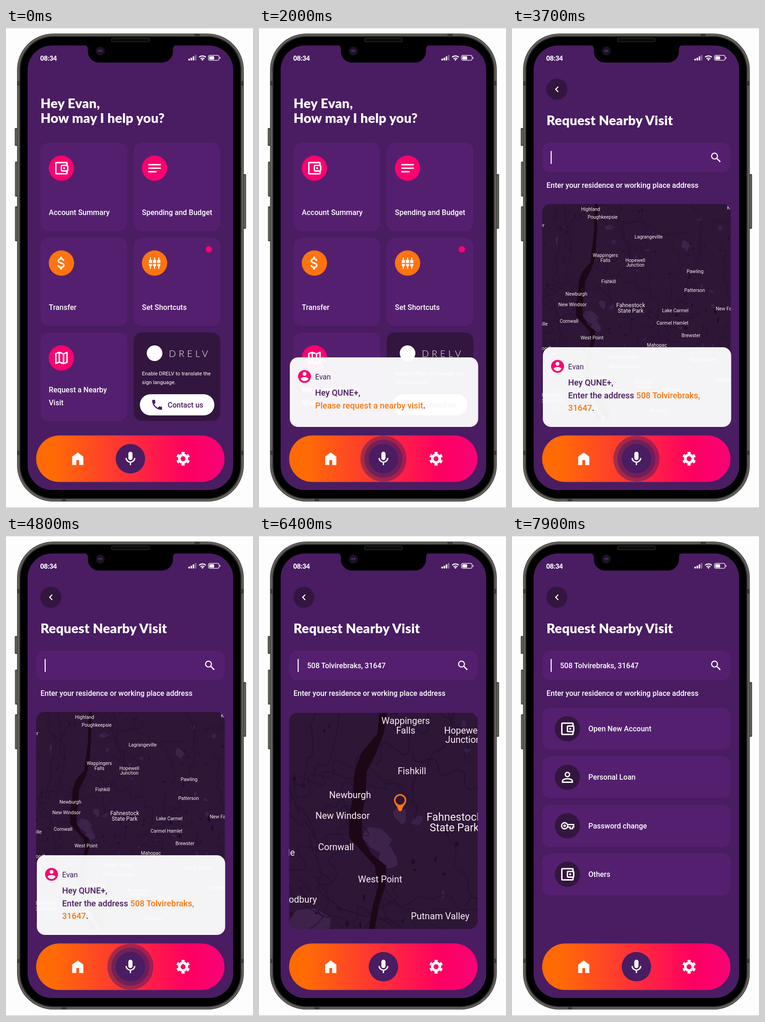
Recreate the animation shown at these times as an HTML page. Size 537 by 1042 pixels, loop 8000 ms.

```html
<!DOCTYPE html>
<html lang="en">
<head>
<meta charset="utf-8">
<title>Voice banking</title>
<style>
  html, body { margin: 0; width: 100%; height: 100%; overflow: hidden; background: #fefdfe; }
  svg { display: block; width: 100%; height: 100%; }
  text { font: 500 16px Roboto, sans-serif; fill: #fff; white-space: pre; }
  .title { font: 900 28.6px Lato, sans-serif; letter-spacing: .25px; }
  .clock { font: 900 14px Lato, sans-serif; }
  .wordmark { font: 300 20px Lato, sans-serif; letter-spacing: 6.2px; }
  .small { font-size: 11.4px; font-weight: 400; }
  .name { font-weight: 400; fill: #40195a; }
  .speech { font-size: 18.3px; fill: #4a1c62; }
  .speech .key { fill: #f9760f; }
  .town { font-size: 10.4px; font-weight: 400; fill: #fbeef3; text-anchor: middle; }
  .park { font-size: 12.2px; }
</style>
</head>
<body>
<svg id="stage" viewBox="0 0 537 1042" xmlns="http://www.w3.org/2000/svg"></svg>
<script>
const PINK = '#fb036f', ORANGE = '#ff7410', SCREEN = '#4a1c62', CARD = '#551f6f', DARK = '#33163f';
const USER = 'Evan', BANK = 'QUNE+', SIGNER = 'DRELV', STREET = '508 Tolvirebraks,', ZIP = '31647';

const rect = (x, y, w, h, r, fill, more = '') =>
  `<rect x="${x}" y="${y}" width="${w}" height="${h}" rx="${r}" fill="${fill}" ${more}/>`;
const circle = (x, y, r, fill, more = '') => `<circle cx="${x}" cy="${y}" r="${r}" fill="${fill}" ${more}/>`;
const path = (d, fill, more = '') => `<path d="${d}" fill="${fill}" ${more}/>`;
const line = (d, color, width, more = '') => path(d, 'none', `stroke="${color}" stroke-width="${width}" ${more}`);
const text = (x, y, str, cls = '', more = '') => `<text x="${x}" y="${y}" class="${cls}" ${more}>${str}</text>`;
const group = (id, body, more = '') => `<g id="${id}" ${more}>${body}</g>`;

// Icons live on a 24 unit grid and are placed by their centre.
const ICONS = {
  wallet: path('M21 7.3V5a2 2 0 0 0-2-2H5a2 2 0 0 0-2 2v14a2 2 0 0 0 2 2h14a2 2 0 0 0 2-2v-2.3a2 2 0 0 0 1-1.7V9a2 2 0 0 0-1-1.7zM20 9v6h-7V9zM5 19V5h14v2h-6a2 2 0 0 0-2 2v6a2 2 0 0 0 2 2h6v2z', '#fff')
    + circle(16, 12, 1.5, '#fff'),
  notes: path('M3 18h12v-2H3zM3 6v2h18V6zM3 13h18v-2H3z', '#fff'),
  dollar: path('M11.8 10.9c-2.27-.59-3-1.2-3-2.15 0-1.09 1.01-1.85 2.7-1.85 1.78 0 2.44.85 2.5 2.1h2.21c-.07-1.72-1.12-3.3-3.21-3.81V3h-3v2.16c-1.94.42-3.5 1.68-3.5 3.61 0 2.31 1.91 3.46 4.7 4.13 2.5.6 3 1.48 3 2.41 0 .69-.49 1.79-2.7 1.79-2.06 0-2.87-.92-2.98-2.1h-2.2c.12 2.19 1.76 3.42 3.68 3.83V21h3v-2.15c1.95-.37 3.5-1.5 3.5-3.55 0-2.84-2.43-3.81-4.7-4.4z', '#fff'),
  sliders: [4, 12, 20].map(x => path(`M${x - 1} 6V2a1 1 0 0 1 2 0v4h2v6h-6V6zM${x - 3} 14h6v2a3 3 0 0 1-2 2.8V23h-2v-4.2a3 3 0 0 1-2-2.8z`, '#fff')).join(''),
  map: line('M4 5.7L9 4l6 2.1 5-1.9v14.1L15 20l-6-2.1-5 1.9zM9 4v14M15 6v14', '#fff', 2, 'stroke-linejoin="round"'),
  home: path('M4 21V9l8-6 8 6v12h-6v-7h-4v7z', '#fff'),
  mic: path('M12 14a3 3 0 0 0 3-3V5a3 3 0 0 0-6 0v6a3 3 0 0 0 3 3z', '#fff')
    + line('M5.9 11a6.1 5.9 0 0 0 12.2 0M12 17v4', '#fff', 1.9),
  gear: circle(12, 12, 5.4, 'none', 'stroke="#fff" stroke-width="3.7"')
    + circle(12, 12, 8.3, 'none', 'stroke="#fff" stroke-width="3" pathLength="12" stroke-dasharray="1 1" stroke-dashoffset=".5" transform="rotate(30 12 12)"'),
  phone: path('M6.62 10.79c1.44 2.83 3.76 5.14 6.59 6.59l2.2-2.2c.27-.27.67-.36 1.02-.24 1.12.37 2.33.57 3.57.57.55 0 1 .45 1 1V20c0 .55-.45 1-1 1-9.39 0-17-7.61-17-17 0-.55.45-1 1-1h3.5c.55 0 1 .45 1 1 0 1.25.2 2.45.57 3.57.11.35.03.74-.25 1.02z', SCREEN),
  person: circle(12, 8, 3.05, 'none', 'stroke="#fff" stroke-width="1.9"')
    + line('M5 17c0-1.6 4-3 7-3s7 1.4 7 3v2H5z', '#fff', 1.9),
  avatar: circle(12, 12, 10, PINK) + circle(12, 8, 3, '#fff')
    + path('M12 19.2c-2.5 0-4.7-1.3-6-3.2 0-2 4-3.1 6-3.1s6 1.1 6 3.1c-1.3 1.9-3.5 3.2-6 3.2z', '#fff'),
  key: circle(8, 12, 4.4, 'none', 'stroke="#fff" stroke-width="1.8"') + circle(8, 12, 1.8, '#fff')
    + line('M12 10.2h9v3.6h-1.6v2.4h-3.6v-2.4H12', '#fff', 1.7)
};
const icon = (name, x, y, s = 1.52) =>
  `<g transform="translate(${x} ${y}) scale(${s}) translate(-12 -12)">${ICONS[name]}</g>`;
const badge = (name, x, y, fill, s) => circle(x, y, 27.5, fill) + icon(name, x, y, s);

function phone() {
  const band = '#3b3a36';
  const rim = (inset, fill) => rect(24 + inset, 12 + inset, 493 - 2 * inset, 1016 - 2 * inset, 79 - inset, fill);
  return rect(0, 0, 537, 1, 0, '#dededf') + rect(0, 1041, 537, 1, 0, '#b9b9ba')
    + [[19, 217, 39], [19.5, 290, 76], [19.5, 387, 76], [516, 317, 119]].map(([x, y, h]) =>
      rect(x, y, 6, h, 2, '#4a4944') + rect(x + 2, y + 3, 2, h - 6, 1, '#6b6a63')).join('')
    + rim(0, '#45443f') + rim(1.5, '#66655f') + rim(4, '#4c4b46')
    + rect(24, 115, 6, 10, 0, band) + rect(24, 918, 6, 9, 0, band)
    + rect(511, 115, 6, 10, 0, band) + rect(511, 918, 6, 9, 0, band)
    + rect(410, 12, 11, 6, 0, band) + rect(121, 1022, 10, 6, 0, band)
    + rim(6, '#232321') + rim(7.5, '#000')
    + rect(47, 38, 447, 965, 53, SCREEN)
    + path('M170 37h201q-8 1-8 9v5a24 24 0 0 1-24 24H202a24 24 0 0 1-24-24v-5q0-8-8-9z', '#000')
    + rect(229.5, 22, 82, 8, 3, '#0b0b0b', 'stroke="#242424" stroke-width="1.5"')
    + circle(205, 50, 10, '#17121c') + circle(205, 50, 6, '#22122f')
    + circle(202.5, 49.5, 2, '#52336b') + circle(207.5, 49.5, 2, '#52336b');
}

function statusBar() {
  return text(74.5, 70.5, '08:34', 'clock')
    + [4, 6, 9, 12].map((h, i) => rect(396.5 + i * 4.7, 70.5 - h, 3.4, h, 1, '#fff', i > 2 ? 'opacity=".35"' : '')).join('')
    + line('M419.8 63.5a10.5 10.5 0 0 1 14.6 0M422.8 67a6.2 6.2 0 0 1 8.6 0', '#fff', 2.2)
    + path('M424.6 68.6a3.5 3.5 0 0 1 5 0l-2.5 2.6z', '#fff')
    + rect(440.2, 59.4, 23, 10.8, 3.5, 'none', 'stroke="#fff" stroke-width="1.2"')
    + rect(442, 61.2, 10.5, 7.2, 1.5, '#fff') + rect(464.6, 63, 1.5, 4, .7, '#fff');
}

function navBar() {
  return rect(65.5, 884.5, 409.5, 101, 50.5, 'url(#nav)')
    + icon('home', 156, 935) + icon('gear', 385, 935)
    + group('rings', circle(270.5, 935, 50, SCREEN, 'opacity=".5"') + circle(270.5, 935, 41.5, SCREEN, 'opacity=".55"'))
    + circle(270.5, 935, 32, SCREEN) + icon('mic', 270.5, 935);
}

function home() {
  const cards = [['wallet', PINK, 'Account Summary'], ['notes', PINK, 'Spending and Budget'],
    ['dollar', ORANGE, 'Transfer'], ['sliders', ORANGE, 'Set Shortcuts', 1.14], ['map', PINK]];
  return text(75, 174, `Hey ${USER},`, 'title') + text(75, 206, 'How may I help you?', 'title')
    + cards.map(([name, fill, label, s], i) => {
      const x = 75 + i % 2 * 202.5, y = 249 + (i >> 1) * 206;
      return rect(x, y, 188.5, 192, 18, CARD) + badge(name, x + 45.5, y + 55.3, fill, s)
        + (label ? text(x + 18, y + 157, label) : '');
    }).join('')
    + circle(441, 480.5, 7, PINK)
    + text(93, 791, 'Request a Nearby') + text(93, 818.5, 'Visit')
    + rect(277.5, 661, 188.5, 192, 18, DARK)
    + circle(323, 706, 17, '#fff') + text(354, 713.5, SIGNER, 'wordmark')
    + text(295.5, 754, `Enable ${SIGNER} to translate the`, 'small') + text(295.5, 772.5, 'sign language.', 'small')
    + rect(291, 795, 162, 46, 23, '#fff') + icon('phone', 328.5, 818, 1.2)
    + text(351.5, 823.7, 'Contact us', '', `style="fill:${SCREEN}"`);
}

function visitHeader() {
  return circle(97.5, 133, 23, DARK) + line('M100.5 127.5l-5.6 5.6 5.6 5.6', '#fff', 2.2)
    + text(75, 211, 'Request Nearby Visit', 'title')
    + rect(65.5, 249, 410, 64, 18, CARD) + rect(84, 267, 2.2, 28, 0, '#fff')
    + circle(440.3, 278, 6.4, 'none', 'stroke="#fff" stroke-width="2.3"') + line('M445 282.7l7.8 7.8', '#fff', 2.6)
    + group('address', text(104.5, 287, `${STREET} ${ZIP}`))
    + text(75, 346.5, 'Enter your residence or working place address');
}

function mapArt() {
  let seed = 11;
  const rnd = (a, b) => a + (b - a) * ((seed = seed * 16807 % 2147483647) / 2147483647);
  const blob = (x, y, w, h, fill) => {
    const points = Array.from({ length: 9 }, (_, i) => {
      const a = i * Math.PI * 2 / 9, k = rnd(.55, 1.1);
      return `${(x + Math.cos(a) * w * k).toFixed(1)} ${(y + Math.sin(a) * h * k).toFixed(1)}`;
    });
    return path(`M${points.join('L')}z`, fill);
  };
  const road = () => {
    let x = rnd(50, 490), y = rnd(370, 860), a = rnd(0, 6.28), d = `M${x} ${y}`;
    for (let i = 0; i < 12; i++) {
      a += rnd(-.6, .6);
      x += Math.cos(a) * 17; y += Math.sin(a) * 17;
      d += `${i ? 'T' : `Q${x - 7} ${y - 5} `}${x.toFixed(1)} ${y.toFixed(1)}`;
    }
    return line(d, '#241132', rnd(.7, 1.4).toFixed(1));
  };
  const many = (n, make) => Array.from({ length: n }, make).join('');
  const hills = [[95, 735, 38, 38], [172, 628, 22, 17], [183, 648, 15, 14], [197, 600, 9, 12], [378, 472, 10, 13],
    [212, 432, 11, 6], [100, 810, 30, 32], [140, 762, 18, 24], [98, 462, 4, 13]];
  const towns = [['Highland', 171, 393], ['Poughkeepsie', 197, 410], ['Lagrangeville', 297, 453], ['Wappingers', 203, 493],
    ['Falls', 203, 504], ['Hopewell', 268, 504], ['Junction', 268, 514.5], ['Pawling', 398, 528], ['Fishkill', 210, 550],
    ['Patterson', 397, 569], ['Newburgh', 140, 577], ['New Windsor', 131.5, 600.5], ['Lake Carmel', 355, 613],
    ['New Fairfield', 473, 609], ['Cornwall', 124, 636], ['Carmel Hamlet', 349, 640], ['Brewster', 389, 667],
    ['West Point', 174, 672.5], ['Mahopac', 315, 688.5], ['Woodbury', 79, 695], ['Putnam Valley', 242, 714],
    ['North Salem', 418, 720], ['Mohegan Lake', 245, 734.5], ['Peekskill', 197, 758], ['Ridgefield', 465, 763],
    ['Yorktown', 287, 769], ['Heights', 287, 779], ['Katonah', 346, 784.5], ['Cortlandt', 210, 788],
    ['Bedford Hills', 336, 804], ['Mt Kisco', 319, 830], ['Kent', 478, 390], ['ville', 68.5, 642], ['er', 66, 428]];
  const parks = [['Fahnestock', 258, 601.5], ['State Park', 258, 613.5], ['Harriman', 84, 797], ['State Park', 84, 809]];
  const water = '#1d0717';
  return rect(0, 350, 537, 520, 0, '#2d1636')
    + hills.map(h => blob(...h, '#3d2249')).join('')
    + many(24, () => blob(rnd(66, 475), rnd(382, 853), rnd(2, 7), rnd(2, 8), '#38204a'))
    + many(46, road)
    + many(80, () => blob(rnd(66, 475), rnd(382, 853), rnd(1, 3), rnd(1.5, 5), '#200d27'))
    + many(14, () => blob(rnd(250, 470), rnd(610, 840), rnd(2, 5), rnd(3, 8), '#1f0a22'))
    + path('M180 380h7L184 450 182 484 178 508 170 529 159 550 157 581 153 602 154 625 164 644 181 657 180 680 173 701 168 728 171 750 175 768 186 778 193 800 215 838V856H184L178 825 166 800 162 770 157 750 161 728 166 701 172 680 168 657 156 644 139 625 139 602 143 581 145 550 153 529 171 508 173 484 178 450z', water, 'stroke-linejoin="round"')
    + line('M215 795l25 10 28-4 20-18 26 4 20-14 10-32', water, 3)
    + towns.map(([name, x, y]) => text(x, y + 3.7, name, 'town')).join('')
    + parks.map(([name, x, y]) => text(x, y + 4.4, name, 'town park')).join('')
    + text(0, 0, 'Hudson River', 'town park', 'transform="translate(169 806) rotate(60)" style="text-anchor:start"');
}

function visitMap() {
  return `<g clip-path="url(#mapClip)">${group('mapArt', mapArt())}</g>`
    + group('pin', path('M302.5 594C301 586 293.5 582 293.5 573.5a13.3 13.3 0 0 1 26.6 0C320 582 312.5 586 311 594q-1 3.5-4.2 3.5t-4.3-3.5zM296.8 573.5a10 10 0 1 0 20 0a10 10 0 1 0-20 0z', ORANGE, 'fill-rule="evenodd"'));
}

function serviceList() {
  return [['wallet', 'Open New Account'], ['person', 'Personal Loan'], ['key', 'Password change'], ['wallet', 'Others']]
    .map(([name, label], i) => {
      const y = 373 + i * 105.3;
      return rect(65.5, y, 410, 91, 18, CARD) + badge(name, 120.5, y + 45.5, DARK) + text(166, y + 51, label);
    }).join('');
}

function popup(top, lines) {
  const y = top + 41.5;
  return rect(67, top, 409.5, 866 - top, 18, '#fff', 'opacity=".95"')
    + icon('avatar', 99, y, 1.4) + text(122, y + 6, USER, 'name')
    + lines.map((str, i) => text(122, y + 41.5 + i * 27.5, str, 'speech')).join('');
}

const key = str => `<tspan class="key">${str}</tspan>`;
const stage = document.getElementById('stage');
stage.innerHTML = `<defs>
  <linearGradient id="nav">
    <stop offset="0" stop-color="#ff6a00"/><stop offset=".1" stop-color="#ff6a06"/>
    <stop offset=".8" stop-color="#fe0061"/><stop offset="1" stop-color="#f80277"/>
  </linearGradient>
  <clipPath id="mapClip"><rect id="mapWindow" x="65.5" y="382" width="410" height="471" rx="18"/></clipPath>
</defs>`
  + phone() + statusBar()
  + group('home', home()) + group('header', visitHeader()) + group('visitMap', visitMap()) + group('list', serviceList())
  + navBar()
  + group('ask', popup(715, [`Hey ${BANK},`, `${key('Please request a nearby visit')}.`]))
  + group('tell', popup(693, [`Hey ${BANK},`, `Enter the address ${key(STREET)}`, `${key(ZIP)}.`]));

const part = Object.fromEntries([...stage.querySelectorAll('[id]')].map(el => [el.id, el]));
const ramp = (t, from, to) => {
  const p = Math.min(1, Math.max(0, (t - from) / (to - from)));
  return p * p * (3 - 2 * p);
};
const show = (id, alpha) => {
  part[id].style.opacity = alpha;
  part[id].style.visibility = alpha > 0 ? 'visible' : 'hidden';
};

function draw(t) {
  const ask = ramp(t, 100, 450) - ramp(t, 2000, 2300);
  const visit = ramp(t, 2000, 2350);
  const tell = ramp(t, 2800, 3150) - ramp(t, 5500, 5800);
  const zoom = ramp(t, 5600, 6200);
  const list = ramp(t, 7300, 7650);
  const listening = Math.max(ask, tell);

  show('home', 1 - visit);
  show('header', visit);
  show('visitMap', visit * (1 - list));
  show('list', list);
  show('ask', ask);
  show('tell', tell);
  show('rings', listening);
  show('address', ramp(t, 5500, 5800));
  show('pin', ramp(t, 5900, 6250));

  const grow = .65 + .35 * listening;
  part.rings.setAttribute('transform', `translate(270.5 935) scale(${grow}) translate(-270.5 -935)`);
  part.mapArt.setAttribute('transform', `translate(${-70.8 * zoom} ${-545.8 * zoom}) scale(${1 + .92 * zoom})`);
  part.mapWindow.setAttribute('y', 382 + 2 * zoom);
  part.mapWindow.setAttribute('height', 471 - 2 * zoom);
}

function tick() {
  draw(performance.now() % 8000);
  requestAnimationFrame(tick);
}
tick();
</script>
</body>
</html>
```
